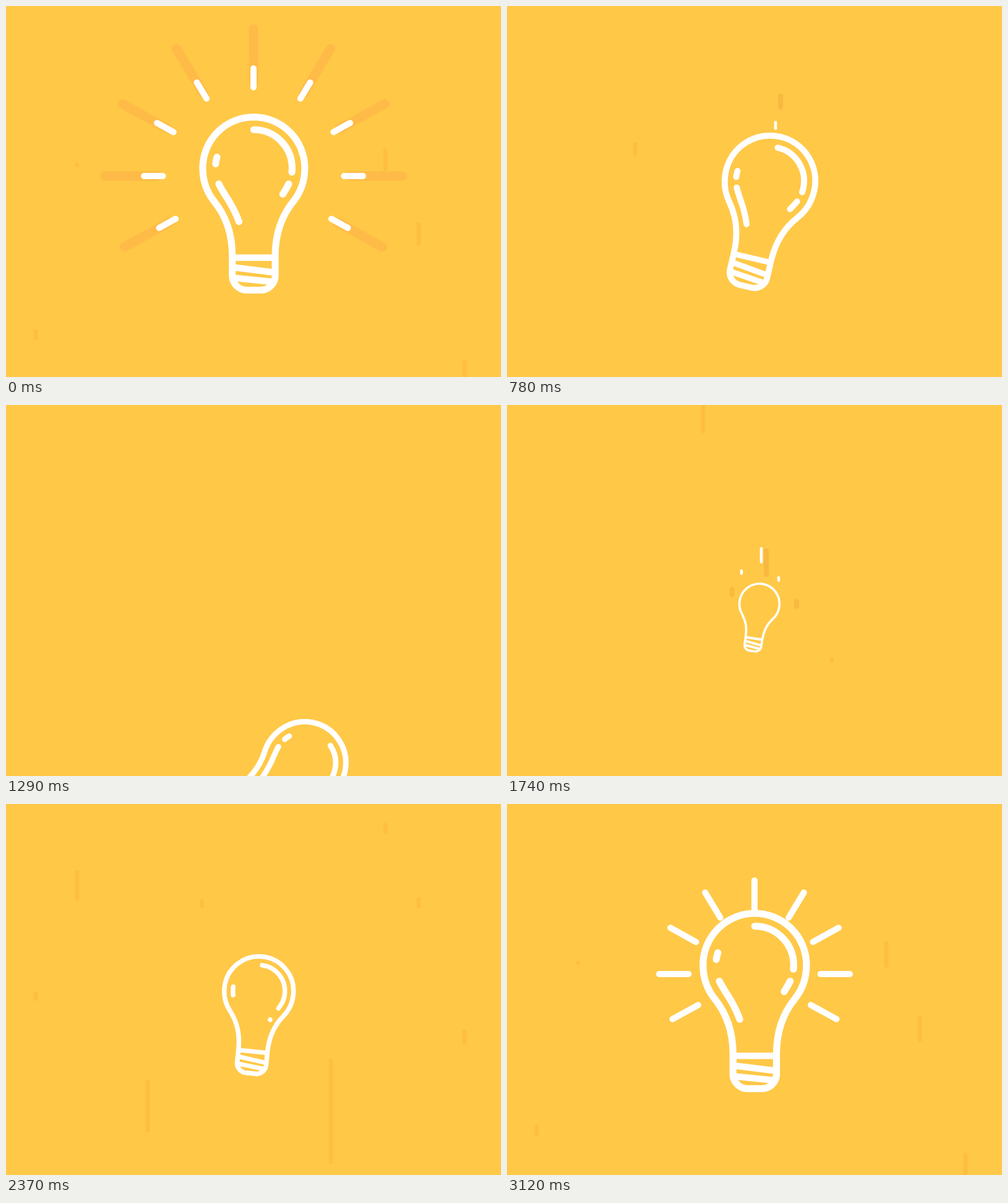
Recreate the animation shown at these times as an HTML page. Size 800 by 600 pixels, loop 3.15 s.

```html
<!DOCTYPE html>
<html lang="en">
<head>
<meta charset="utf-8">
<title>Light bulb</title>
<style>
  html, body { margin: 0; width: 100%; height: 100%; overflow: hidden; background: #ffc847; }
  svg { display: block; width: 100%; height: 100%; }
  line, path { stroke-linecap: round; stroke-linejoin: round; }
  #drops { stroke: #ffbd42; stroke-width: 6.6; }
  #glows { stroke: #ffbb47; stroke-width: 15; }
  #beams { stroke: #fff; stroke-width: 10; }
  #trails { stroke-width: 4.6; }
  #bulb { stroke: #fff; fill: none; }
  #shell { fill: #ffc847; }
  .thread { stroke-linecap: butt; stroke-width: 10.5; }
</style>
</head>
<body>
<svg viewBox="0 0 800 600">
  <g id="drops"></g>
  <g id="glows"></g>
  <g id="trails"></g>
  <g id="beams"></g>
  <g id="bulb">
    <path id="shell" d="M-34.7 18C-34.7-22-47-49-64-70C-76-85-82.5-103-82.5-124A82.5 82.5 0 0 1 82.5-124C82.5-103 76-85 64-70C47-49 34.7-22 34.7 18V50A23.5 23.5 0 0 1 11.2 73.5H-11.2A23.5 23.5 0 0 1-34.7 50Z"/>
    <path class="thread" d="M-34 21H34M-34 36.5L34 45M-34 53.5L34 60.5"/>
  </g>
</svg>
<script>
const LOOP = 3150;
const BIRTH = 1400; // the old bulb is gone, the next one is on its way
const NS = 'http://www.w3.org/2000/svg';
const $ = id => document.getElementById(id);

function set(el, attrs) {
  for (const k in attrs) el.setAttribute(k, attrs[k]);
}

function add(parent, tag, attrs) {
  const el = document.createElementNS(NS, tag);
  set(el, attrs);
  return parent.appendChild(el);
}

function show(el, on) {
  el.style.display = on ? '' : 'none';
}

const mix = (a, b, u) => a + (b - a) * u;
const ramp = (a, b, t) => Math.min(1, Math.max(0, (t - a) / (b - a)));
const easeOut = (u, power) => 1 - Math.pow(1 - u, power);
const out = (a, b, t, power) => easeOut(ramp(a, b, t), power);
const smooth = (a, b, t) => {
  const u = ramp(a, b, t);
  return u * u * (3 - 2 * u);
};

// A streak whose head races ahead and whose tail follows after a lag
const trim = (u, lag, power = 2.7) => [out(lag, 1, u, power), out(0, 1, u, power)];

// Bulb pose; t runs on from BIRTH past the end of the loop
const scale = t => .392 * out(1480, 1740, t, 1.5) + .415 * smooth(1780, 2720, t)
  + .209 * smooth(2800, 3090, t) - .092 * out(3115, 3595, t, 2.5) - .12 * smooth(3710, 4300, t);

const height = t => 270 + 116 * out(1480, 1900, t, 2) + 410 * ramp(3600, 4540, t) ** 4.5;

const tilt = t => 9 * Math.sqrt(ramp(3120, 1740, t)) * Math.cos(2 * Math.PI * (t - 1740) / 690)
  + 56 * smooth(3690, 4460, t);

// Reflections grow from an origin on the inner contour, measured from the top
const shines = [
  { side: 1, origin: 150, start: [1950, 2400, 0], end: [2050, 2950, 104] },
  { side: 1, origin: 170, start: [2340, 3100, 124], end: [2790, 3120, 143] },
  { side: -1, origin: 40, start: [1900, 2700, 124], end: [1780, 3000, 193] },
  { side: -1, origin: 40, start: [2785, 3130, 77], end: [2770, 3130, 88], drift: 16 }
];
for (const shine of shines) {
  shine.el = add($('bulb'), 'path', {
    d: 'M0-186A62 62 0 0 1 62-124C62-106 57-98 46-80C38-68 28-50 22-32',
    transform: `scale(${shine.side} 1)`
  });
}

function drawBulb(t) {
  const size = scale(t);
  show($('bulb'), size > .005);
  set($('bulb'), {
    transform: `translate(400.4 ${height(t)}) rotate(${tilt(t)}) scale(${size})`,
    'stroke-width': mix(9.4, 11.1, ramp(1740, 2300, t))
  });
  for (const { origin, start, end, drift = 0, el } of shines) {
    const reach = ([t0, t1, goal]) => mix(origin, goal, smooth(t0, t1, t));
    const a = reach(start) + drift * out(3115, 3595, t, 2);
    const b = reach(end) + drift * out(3115, 3595, t, 2);
    show(el, t > Math.min(start[0], end[0]));
    set(el, { 'stroke-dasharray': `${Math.max(.01, b - a)} 999`, 'stroke-dashoffset': -a });
  }
}

// Rays fan out every 30 degrees, slightly pushed out at the shoulders
const CENTER = { x: 400, y: 275 };
const rays = [];
for (let deg = -120; deg <= 120; deg += 30) {
  const a = deg * Math.PI / 180;
  const dir = a + .024 * Math.sin(2 * a);
  rays.push({
    dx: Math.sin(dir), dy: -Math.cos(dir),
    extra: 4 * Math.abs(Math.sin(1.5 * a)),
    glow: add($('glows'), 'line'),
    beam: add($('beams'), 'line')
  });
}

function placeRay({ dx, dy, extra }, el, a, b) {
  a += extra;
  b += extra;
  set(el, {
    x1: CENTER.x + dx * a, y1: CENTER.y + dy * a,
    x2: CENTER.x + dx * b, y2: CENTER.y + dy * b
  });
}

function drawRays(t) {
  const [tail, head] = trim(ramp(LOOP - 90, LOOP + 210, t), .155, 3.3);
  show($('beams'), head - tail > .01);
  const u = ramp(LOOP, LOOP + 510, t);
  show($('glows'), t >= LOOP && u < 1);
  $('glows').style.opacity = (1 - u) ** 3;
  for (const ray of rays) {
    placeRay(ray, ray.beam, mix(80, 215, tail), mix(80, 215, head));
    placeRay(ray, ray.glow, mix(153, 379, easeOut(u, 2)), mix(237, 380, easeOut(u, 3)));
  }
}

// Faint background streaks: x, top, start, life, lag
const drops = [
  [613, 34, 2350, 1270, .32],
  [667, 154, 2350, 1270, .32],
  [741, 368, 2335, 1270, .3],
  [48, 307, 2355, 1270, .16],
  [115, 10, 2060, 1130, .12],
  [229, 358, 1950, 1200, .23],
  [525, 411, 1735, 1850, .34],
  [317, -72, 1480, 1270, .21],
  [207, 10, 310, 760, .2]
].map(([x, top, start, life, lag]) => ({
  top, start, life, lag, el: add($('drops'), 'line', { x1: x, x2: x })
}));

function drawDrops(t) {
  for (const { top, start, life, lag, el } of drops) {
    const age = (t - start + LOOP) % LOOP;
    const [tail, head] = trim(age / life, lag);
    show(el, age < life);
    set(el, { y1: top + 247 * tail, y2: top + 247 * head + .01 });
  }
}

// Speed trails: white lines, and the same lines enlarged and darker behind them
const trails = [[11, -57, 88], [-21, 28.4, 18], [39, 39.4, 18]];
const gusts = [{ start: 761, x: 423, y: 245 }, { start: 1434, x: 400, y: 227 }];
for (const gust of gusts) {
  gust.layers = [['#f8b940', 1.74], ['#fff', 1]].map(([stroke, zoom]) => {
    const el = add($('trails'), 'g', {
      stroke, transform: `translate(${gust.x} ${gust.y}) scale(${zoom})`
    });
    return { el, lines: trails.map(([x]) => add(el, 'line', { x1: x, x2: x })) };
  });
}

function drawTrails(t) {
  for (const { start, layers } of gusts) {
    const u = ramp(start, start + 450, t);
    const [tail, head] = trim(u, .5);
    for (const { el, lines } of layers) {
      show(el, u > 0 && head - tail > .01);
      trails.forEach(([, top, length], i) =>
        set(lines[i], { y1: top + length * tail, y2: top + length * head }));
    }
  }
}

function frame() {
  const t = performance.now() % LOOP;
  const bulbTime = t < BIRTH ? t + LOOP : t;
  drawDrops(t);
  drawTrails(t);
  drawRays(bulbTime);
  drawBulb(bulbTime);
  requestAnimationFrame(frame);
}
frame();
</script>
</body>
</html>
```
